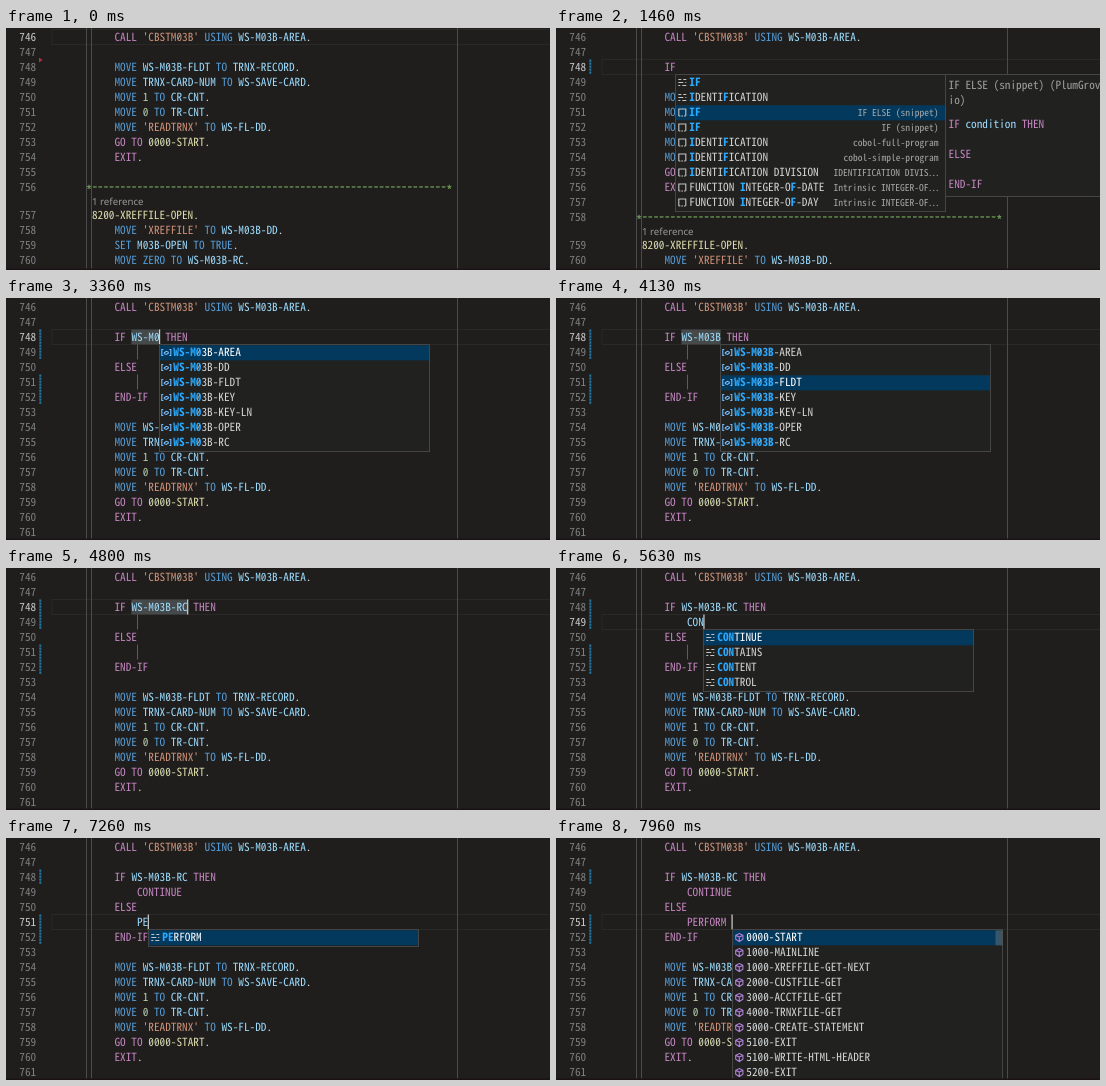
An HTML page that plays this animation: 544 by 242 pixels, repeating every 8 s.

```html
<!DOCTYPE html>
<html lang="en">
<head>
<meta charset="utf-8">
<title>COBOL editor</title>
<style>
  html, body { margin: 0; width: 100%; height: 100%; overflow: hidden; background: #1f1e1d; }
  svg { display: block; width: 100vw; height: 100vh; }
  text {
    font: 11.25px 'Noto Sans Mono CJK KR', 'Noto Sans Mono CJK JP', 'Noto Sans Mono', monospace;
    white-space: pre; fill: #d4d4d4; text-rendering: geometricPrecision;
  }
  .num { fill: #7e7f81; }
  .now { fill: #c8c8c8; }
  .lens { font: 9.7px 'Noto Sans', sans-serif; fill: #999; }
  .detail { font-size: 9.5px; fill: #a8a8a8; text-anchor: end; }
  .hit { fill: #2aaaff; font-weight: bold; }
  .sel { fill: #fff; }
  .icon { fill: none; stroke: #c5c5c5; stroke-width: 1.1; }
  .slash { fill: none; stroke: #bcd0d2; stroke-width: .8; }
  .kw { fill: #c586c0; } .verb { fill: #569cd6; } .name { fill: #9cdcfe; } .para { fill: #dcdcaa; }
  .str { fill: #ce9178; } .val { fill: #b5cea8; } .dim { fill: #a0a0a0; }
  .note { fill: #6a9955; stroke: #6a9955; stroke-width: .4; }
</style>
</head>
<body>
<svg id="stage" viewBox="0 0 544 242" preserveAspectRatio="none"></svg>
<script>
const LOOP = 8000, BLINK = 250, CW = 5.625, LH = 15, TOP = 1.5;
const PAPER = '#1f1e1d', POPUP = '#212120', EDGE = 'stroke="#454545"';
const stage = document.getElementById('stage');
const X = col => 46.6 + col * CW;
const Y = row => TOP + row * LH;

// Drawing helpers
const rect = (x, y, w, h, fill, extra = '') =>
  `<rect x="${x}" y="${y}" width="${w}" height="${h}" fill="${fill}" ${extra}/>`;
const text = (x, y, body, cls = '') => `<text x="${x}" y="${y}" class="${cls}">${body}</text>`;
const span = (cls, s) => `<tspan class="${cls}">${s}</tspan>`;

// The typeface shows slashed zeros
const slashes = (x, y, s) => [...s].map((c, i) =>
  c === '0' ? `<path class="slash" d="M${x + i * CW + 1.7} ${y - 1.9}l2.2-4.4"/>` : '').join('');

// Syntax colours
const TOKEN = /('[^']*')|(\b(?:GO TO|CALL|IF|THEN|ELSE|END-IF|EXIT|CONTINUE|PERFORM)(?![\w-]))|(\b(?:MOVE|TO|USING|SET|TRUE|ZERO)(?![\w-]))|(\b\d{4}-[\w-]+)|(\b\d+\b)|([A-Za-z][\w-]*)/g;
const KINDS = ['str', 'kw', 'verb', 'para', 'val', 'name'];
const star = '<tspan dy="2.4">*</tspan>';
const paintNote = s => span('note', `${star}<tspan dy="-3.2">${s.slice(1, -1)}</tspan><tspan dy="3.2">*</tspan>`);
const paint = s => s[0] === '*' ? paintNote(s)
  : s.replace(TOKEN, (m, ...g) => span(KINDS[g.findIndex((v, i) => i < 6 && v)], m));
const startCol = s => s[0] === '*' ? 6 : /^\d/.test(s) ? 7 : 11;

// Program text; '@' marks a lens row
const head = ["CALL 'CBSTM03B' USING WS-M03B-AREA."];
const tail = [
  '', 'MOVE WS-M03B-FLDT TO TRNX-RECORD.', 'MOVE TRNX-CARD-NUM TO WS-SAVE-CARD.',
  'MOVE 1 TO CR-CNT.', 'MOVE 0 TO TR-CNT.', "MOVE 'READTRNX' TO WS-FL-DD.",
  'GO TO 0000-START.', 'EXIT.', '', '*' + '-'.repeat(63) + '*', '@1 reference',
  '8200-XREFFILE-OPEN.', "MOVE 'XREFFILE' TO WS-M03B-DD.", 'SET M03B-OPEN TO TRUE.',
  'MOVE ZERO TO WS-M03B-RC.'
];
const block = (cond, yes = '', no = '') =>
  ['', `IF ${cond} THEN`, '    ' + yes, 'ELSE', '    ' + no, 'END-IF'];

// Completion lists: [icon, label, detail]
const pick = (icon, words, typed) =>
  words.split(' ').filter(w => w.startsWith(typed)).map(w => [icon, w]);
const ifItems = [
  ['word', 'IF'], ['word', 'IDENTIFICATION'], ['box', 'IF', 'IF ELSE (snippet)'],
  ['box', 'IF', 'IF (snippet)'], ['box', 'IDENTIFICATION', 'cobol-full-program'],
  ['box', 'IDENTIFICATION', 'cobol-simple-program'],
  ['box', 'IDENTIFICATION DIVISION', 'IDENTIFICATION DIVIS…'],
  ['box', 'FUNCTION INTEGER-OF-DATE', 'Intrinsic INTEGER-OF…'],
  ['box', 'FUNCTION INTEGER-OF-DAY', 'Intrinsic INTEGER-OF…']
];
const vars = 'CARD-NUM CARD-TBL FL-DD M03B-AREA M03B-DD M03B-FLDT M03B-KEY M03B-KEY-LN M03B-OPER M03B-RC SAVE-CARD TOTAL-AMT'
  .replace(/\S+/g, 'WS-$&');
const cWords = 'CONTINUE CALL CLOSE COMPUTE CONTAINS CONTENT CONTROL COPY COUNT';
const pWords = 'PERFORM PACKED-DECIMAL PAGE PICTURE POINTER PROCEDURE PROGRAM';
const paras = '0000-START 1000-MAINLINE 1000-XREFFILE-GET-NEXT 2000-CUSTFILE-GET 3000-ACCTFILE-GET 4000-TRNXFILE-GET 5000-CREATE-STATEMENT 5100-EXIT 5100-WRITE-HTML-HEADER 5200-EXIT';

const ICONS = {
  word: '<path d="M-4-3h3M1-3h3M-4 0h5M3 0h1M-4 3h2M0 3h4"/>',
  box: '<path d="M-3.5 3.5v-7h7v7"/><path d="M-3.5 3.5h7" stroke-dasharray="1.6 1"/>',
  data: '<path d="M-3-3h-1.5v6h1.5M3-3h1.5v6h-1.5M-2 .2l2-1.4 2 .8v1l-2 1.4-2-.8z" stroke="#75beff"/>',
  cube: '<path d="M0-4l3.6 1.8v4L0 4l-3.6-2.2v-4zM-3.6-2.2L0-.4l3.6-1.8M0-.4V4" stroke="#b180d7"/>'
};

function mark(label, typed) {
  const hits = new Set();
  let at = typed ? label.search(new RegExp('\\b' + typed[0])) : -1;
  for (const c of typed) {
    at = label.indexOf(c, at);
    if (at < 0) break;
    hits.add(at++);
  }
  return [...label].map((c, i) => hits.has(i) ? span('hit', c) : c).join('')
    .replace(/<\/tspan><tspan class="hit">/g, '');
}

function drawDoc(x, y) {
  const lines = [
    [0, span('dim', 'IF ELSE (snippet) (PlumGrovStud')], [1, span('dim', 'io)')],
    [2.65, paint('IF condition THEN')], [4.65, paint('ELSE')], [6.65, paint('END-IF')]
  ];
  return rect(x, y, 170, 122, POPUP, EDGE) +
    lines.map(([r, s]) => text(x + 3, y + 14.2 + r * LH, s)).join('');
}

function drawList({ items, typed = '', sel = 0, thumb = 0, doc }, col, row) {
  const x = Math.floor(X(col) + .1) + .5, y = Y(row + 1), w = 270;
  const rows = items.map(([icon, label, detail], i) => {
    const top = y + .8 + i * LH, tx = x + 13.8, ty = top + 10.8;
    return (i === sel ? rect(x + .5, top, w - 1, LH, '#04395e') : '') +
      `<g class="icon" transform="translate(${x + 6.8} ${top + 7.2})">${ICONS[icon]}</g>` +
      text(tx, ty, mark(label, typed), i === sel ? 'sel' : '') + slashes(tx, ty, label) +
      (detail ? text(x + w - 7, ty - .4, detail, 'detail') : '');
  }).join('');
  const h = items.length * LH + 2 + (y + items.length * LH > 240 ? 20 : 0);
  return rect(x, y, w, h, POPUP, EDGE) + rows +
    (thumb ? rect(x + w - 7, y + .8, 7, thumb, '#797979', 'fill-opacity=".45"') : '') +
    (doc ? drawDoc(x + w, y) : '');
}

// Timeline: each step patches the state and restarts the caret blink
const steps = [];
const at = (time, patch, quiet) => {
  const prev = steps[steps.length - 1] || {};
  steps.push({ ...prev, list: null, ...patch, time, key: quiet ? prev.key : time });
};
const choose = (time, sel, extra) =>
  at(time, { list: { ...steps[steps.length - 1].list, sel, ...extra } }, true);
const popup = (time, list) => at(time, { list }, true);

at(-BLINK, { ins: [], row: 0, col: 46, bars: [], stops: [], box: 0, cut: true });
at(30, { ins: [''], row: 1, col: 11 });
at(100, { ins: ['', ''], row: 2, cut: false, bars: [2] });

at(510, { ins: ['', 'I'], col: 12 });
popup(580, { items: ifItems, typed: 'I' });
at(700, { ins: ['', 'IF'], col: 13 });
popup(780, { items: ifItems, typed: 'IF' });
choose(1000, 1);
choose(1200, 2);
choose(1270, 2, { doc: true });

at(1500, { ins: block('condition'), col: 23, box: 9, bars: [2, 3, 5, 6], stops: [3, 5] });
const typeVar = (time, s) => {
  const patch = { ins: block(s), col: 14 + s.length, box: s.length };
  const items = pick('data', vars, s);
  const list = { items, typed: s, thumb: items.length > 7 ? 95 : 0 };
  at(time, s.length > 1 ? { ...patch, list } : patch);
  if (s.length === 1) popup(time + 80, list);
};
[[1910, 1], [2600, 2], [2960, 3], [3140, 4], [3330, 5], [3520, 6], [3700, 7]]
  .forEach(([time, n]) => typeVar(time, 'WS-M03B'.slice(0, n)));
[3900, 4060, 4180, 4300, 4420, 4540].forEach((time, i) => choose(time, i + 1));
const cond = 'WS-M03B-RC';
at(4680, { ins: block(cond), col: 24, box: 10 });

at(5160, { row: 3, col: 15, box: 0, stops: [5] });
[1, 2, 3, 4].forEach(n => {
  const s = 'CONT'.slice(0, n);
  at(5200 + n * 130, { ins: block(cond, s), col: 15 + n, list: { items: pick('word', cWords, s), typed: s } });
});
at(6000, { ins: block(cond, 'CONTINUE'), col: 23, bars: [2, 5, 6] });
at(6180, { row: 5, col: 15, stops: [] });
at(6655, {});

[1, 2].forEach(n => {
  const s = 'PE'.slice(0, n);
  at(6820 + n * 110, { ins: block(cond, 'CONTINUE', s), col: 15 + n, list: { items: pick('word', pWords, s), typed: s } });
});
at(7500, { ins: block(cond, 'CONTINUE', 'PERFORM'), col: 22 });
at(7720, { ins: block(cond, 'CONTINUE', 'PERFORM '), col: 23 });
popup(7790, { items: pick('cube', paras, ''), thumb: 15 });

function draw(s, caret) {
  let out = rect(0, 0, 544, 242, PAPER);
  out += rect(46, Y(s.row), 520, LH, 'none', 'stroke="#292928"');
  for (const col of [6, 7, 72]) out += rect(Math.floor(X(col)), 0, 1, 242, '#4b4b4b');
  if (s.box) out += rect(X(14), Y(2), s.box * CW, LH, s.box === 9 ? '#264f78' : '#45494a');
  for (const r of s.stops) out += rect(Math.round(X(15)), Y(r), 1, LH, '#5c5c5c');
  for (const r of s.bars) {
    out += `<path d="M34.3 ${Y(r)}v${LH}" stroke="#1f78a6" stroke-width="2" stroke-dasharray="2.2 .8"/>`;
  }
  if (s.cut) out += '<path d="M33 29.5l3.5 2.5-3.5 2.5z" fill="#a8363b"/>';

  let y = TOP, num = 746;
  for (const line of [...head, ...s.ins, ...tail]) {
    if (y > 242) break;
    if (line[0] === '@') {
      out += text(86, y + 10.4, line.slice(1), 'lens');
      y += 13;
      continue;
    }
    const x = X(startCol(line)), base = y + 11.6;
    out += text(13.3, base, num, num - 746 === s.row ? 'now' : 'num');
    out += text(x, base, paint(line)) + slashes(x, base, line);
    y += LH;
    num++;
  }
  if (caret) out += rect(X(s.col) - .5, Y(s.row), 1.2, LH, '#d0d0ce');
  if (s.list) out += drawList(s.list, s.col, s.row);
  out += rect(0, 240.5, 544, 1.5, '#1b1216');
  stage.innerHTML = out;
}

let shown = '';
function frame() {
  const t = performance.now() % LOOP;
  let i = steps.length - 1;
  while (steps[i].time > t) i--;
  const caret = Math.floor((t - steps[i].key) / BLINK) % 2 === 0;
  const id = i + ':' + caret;
  if (id !== shown) draw(steps[i], caret);
  shown = id;
  requestAnimationFrame(frame);
}
frame();
</script>
</body>
</html>
```
